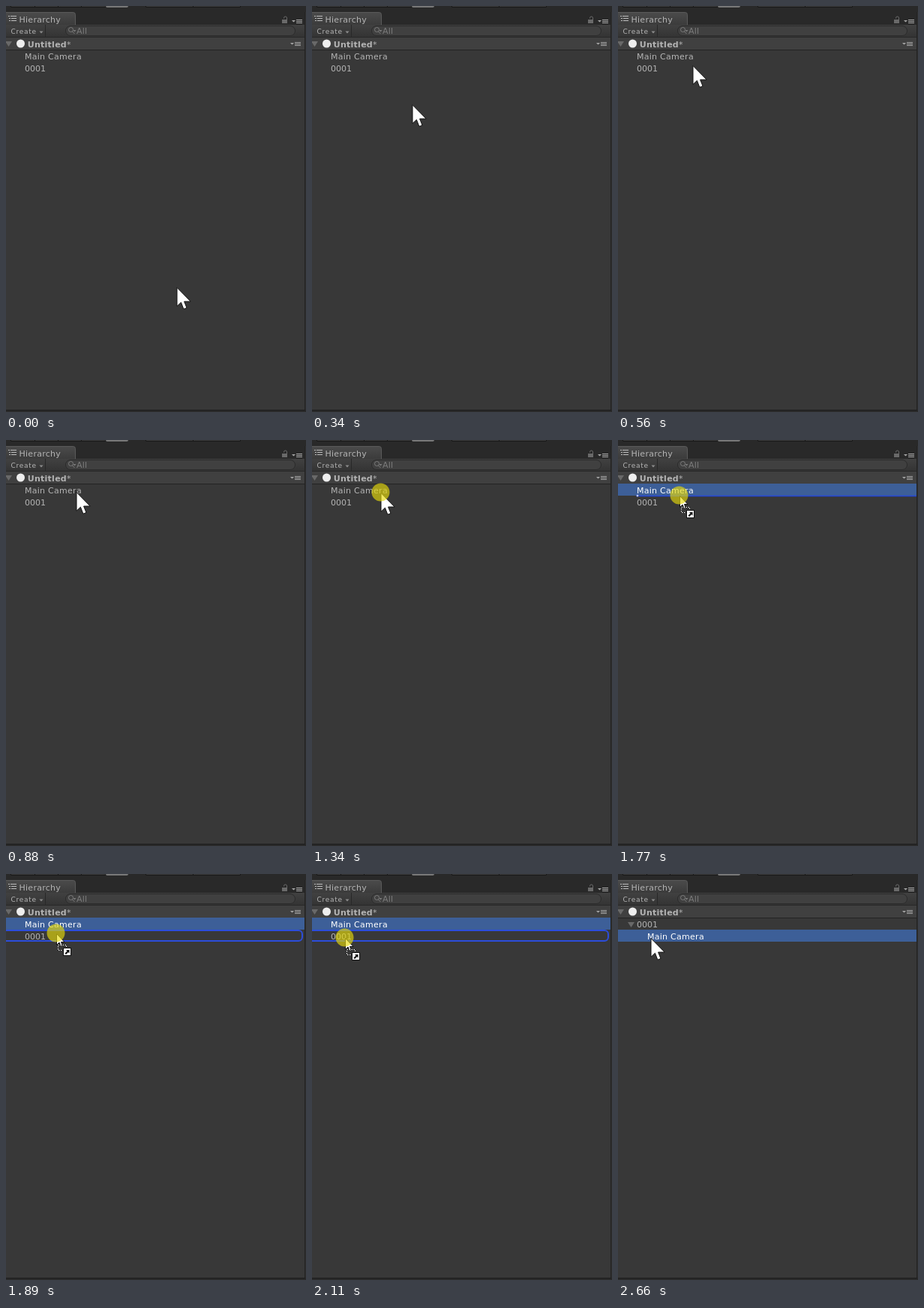
Animation of 400x540 px, one loop 3.29 s. Source, as an HTML page:

```html
<!DOCTYPE html>
<html lang="en">
<head>
<meta charset="utf-8">
<title>Hierarchy panel</title>
<style>
  html, body { margin: 0; width: 100%; height: 100%; overflow: hidden; background: #383838; }
  svg { display: block; width: 400px; height: 540px; }
  text { font: 11px "DejaVu Sans", sans-serif; letter-spacing: .27px; fill: #b4b4b4; white-space: pre; }
  .bold { font-weight: bold; }
  .create { font-size: 9px; letter-spacing: .75px; }
  .dim { fill: #7c7c7c; }
  .num { letter-spacing: 0; }
</style>
</head>
<body>
<svg viewBox="0 0 400 540">
  <defs>
    <linearGradient id="tab" x2="0" y2="1">
      <stop stop-color="#4b4b4b"/><stop offset="1" stop-color="#3b3b3b"/>
    </linearGradient>
    <linearGradient id="bar" x2="0" y2="1">
      <stop stop-color="#414141"/><stop offset="1" stop-color="#333"/>
    </linearGradient>
    <g id="menu">
      <path d="M-1 2h5l-2.500 2.500z" fill="#a5a5a5"/>
      <path d="M5 1.500h8M5 3.500h8M5 5.500h8" stroke="#a5a5a5"/>
    </g>
  </defs>

  <!-- Window edges and strip above the panel -->
  <rect width="400" height="540" fill="#383838"/>
  <rect width="400" height="25" fill="#292929"/>
  <path d="M6.500 -1V1.500H133V-1M38.500 0v1M69.500 0v1M100.500 0v1M186.500 -1V1.500H312.500V-1M249.500 0v1" fill="#3c3c3c" stroke="#181818"/>
  <rect x="133" y="-4" width="30" height="6" rx="2" fill="#777"/>

  <!-- Tab -->
  <path d="M-1 25V8.500H89.500Q92.500 8.500 92.500 11.500V25" fill="url(#tab)" stroke="#5a5a5a"/>
  <path d="M3 13.500h2M4 16.500h2M4 19.500h2M6 13.500h8M7 16.500h7M7 19.500h7" stroke="#bcbcbc"/>
  <text x="17.500" y="22">Hierarchy</text>
  <path d="M370.500 16.500v-.5a2 2 0 0 1 4 0v2.500" fill="none" stroke="#696969"/>
  <rect x="368" y="18" width="7" height="5" fill="#696969"/>
  <use href="#menu" x="382" y="17"/>

  <!-- Toolbar -->
  <rect y="25" width="398" height="17" fill="url(#bar)"/>
  <path d="M0 41.500H398M52.500 25V41" stroke="#282828"/>
  <text class="create" x="6.500" y="37">Create</text>
  <path d="M44.500 33.500h5l-2.500 3z" fill="#8c8c8c"/>
  <rect x="79.500" y="26.500" width="306" height="13" rx="6.500" fill="#404040" stroke="#2b2b2b"/>
  <path d="M88.500 34l3 3" stroke="#7c7c7c"/>
  <circle cx="86.500" cy="31.500" r="3" fill="none" stroke="#7c7c7c"/>
  <path d="M89.500 32h4l-2 2.500z" fill="#7c7c7c"/>
  <text class="dim" x="94" y="36.500">All</text>

  <!-- Scene row -->
  <rect y="42" width="398" height="16" fill="#404040"/>
  <path d="M0 58.500H398" stroke="#242424"/>
  <path d="M-1 47h9l-4.500 7z" fill="#696969"/>
  <circle cx="19.500" cy="50" r="5.500" fill="#eee"/>
  <text class="bold" x="28.700" y="55">Untitled<tspan font-weight="normal">*</tspan></text>
  <use href="#menu" x="380" y="47"/>

  <!-- Tree -->
  <rect id="select" width="398" height="16" fill="#3d5f98"/>
  <path id="fold" d="M13 64h9l-4.500 7z" fill="#696969"/>
  <text id="camera">Main Camera</text>
  <text id="item" class="num" x="25">0001</text>
  <g id="line">
    <path d="M28 74.500H398" stroke="#2446d8" stroke-width="1.500"/>
    <circle cx="26" cy="74" r="1.500" fill="#dce4ff" stroke="#2446d8" stroke-width=".5"/>
  </g>
  <rect id="target" x="-4" y="75" width="399" height="14" rx="5" fill="none" stroke="#2c4ddb" stroke-width="2"/>

  <path d="M398.500 8V540" stroke="#222"/>
  <rect x="399" y="8" width="1" height="532" fill="#303030"/>
  <rect y="537" width="400" height="3" fill="#292929"/>
  <path d="M0 537.500H399" stroke="#1c1c1c"/>

  <!-- Pointer -->
  <g id="pointer">
    <path id="arrow" d="M0 .5V25.300L5.400 20.200L8.900 29.200L13 27.500L9.600 19H18.200Z" fill="#fff" stroke="#111"/>
    <g id="drag">
      <path d="M.5 .5V15.500L4 12L6.500 17.500L8.500 16.500L6.500 11.500H11Z" fill="#fff" stroke="#111"/>
      <rect x="2.500" y="15.500" width="11" height="7" fill="none" stroke="#111"/>
      <rect x="2.500" y="15.500" width="11" height="7" fill="none" stroke="#fff" stroke-dasharray="1.500"/>
      <rect x="9.500" y="19.500" width="10" height="10" fill="#fff" stroke="#111"/>
      <path d="M13 22h4.500v4.500l-1.500-1.500l-3 3l-1.500-1.500l3-3z" fill="#111"/>
    </g>
    <circle id="press" cx="-.5" cy="-.5" r="12" fill="#e6da0a" fill-opacity=".65"/>
  </g>
</svg>
<script>
const LOOP = 3290, PRESS = 1340, SELECT = 1470, DRAG = 1770, OVER = 1890, DROP = 2660;

// Pointer tip: [time, x, y], each held until the next
const path = [
  [0, 228, 374], [220, 174, 232], [340, 134, 131], [440, 113, 99], [550, 100, 79],
  [660, 95, 71], [780, 95, 70], [880, 94, 69], [1000, 93, 69], [1120, 92, 70],
  [DRAG, 82, 74], [OVER, 67, 79], [2000, 52, 83], [2110, 44, 85]
];

const $ = id => document.getElementById(id);
const show = (id, on) => $(id).style.display = on ? "" : "none";
const set = (id, attrs) => {
  for (const k in attrs) $(id).setAttribute(k, attrs[k]);
};

function draw(t) {
  const [, x, y] = path.findLast(p => p[0] <= t);
  const dropped = t >= DROP, dragging = t >= DRAG && !dropped;
  const selected = t >= SELECT;

  set("pointer", { transform: `translate(${x} ${y})` });
  show("press", t >= PRESS && !dropped);
  show("drag", dragging);
  show("arrow", !dragging);

  show("line", dragging && t < OVER);
  show("target", dragging && t >= OVER);
  show("select", selected);
  show("fold", dropped);
  set("select", { y: dropped ? 74 : 58 });
  set("camera", { x: dropped ? 39 : 25, y: dropped ? 87 : 71 });
  set("item", { y: dropped ? 71 : 87 });
  $("camera").style.fill = selected ? "#fff" : "";
}

function tick() {
  draw(performance.now() % LOOP);
  requestAnimationFrame(tick);
}
tick();
</script>
</body>
</html>
```
